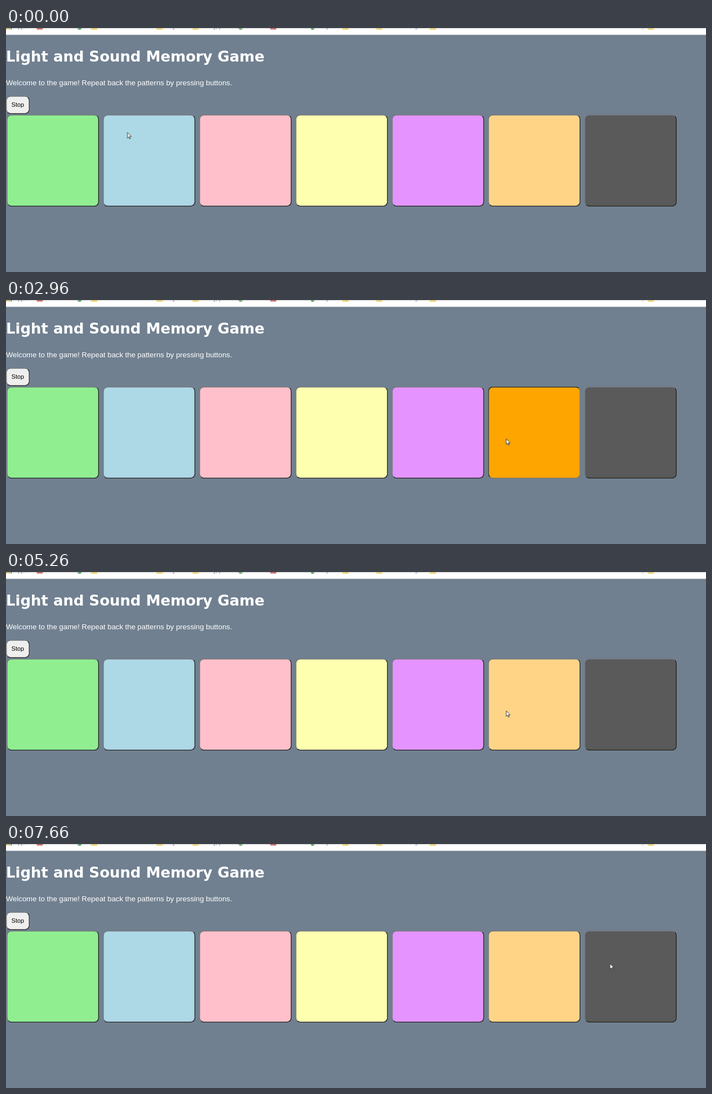
An HTML page for the animation above (8 s loop, 1265 px wide and 443 px high).

```html
<!DOCTYPE html>
<html lang="en">
<head>
<meta charset="utf-8">
<title>Light and Sound Memory Game</title>
<style>
  html, body { margin: 0; width: 100%; height: 100%; overflow: hidden; background: #708090; }
  /* The page is laid out at 1.5 times the stage size. */
  #page { position: absolute; left: 0; top: 0; transform: scale(.6666667); transform-origin: 0 0; }
  .button {
    position: absolute; box-sizing: border-box;
    border: 2px solid; border-color: #767676 #212121 #212121 #767676;
    border-radius: 12.5px;
  }
  .tile { top: 236px; width: 250px; height: 250px; }
  .stop { left: 0; top: 185px; width: 64px; height: 49px; background: #efefef; }
  svg { position: absolute; left: 0; top: 0; }
  text { font-family: "Liberation Sans", Arial, sans-serif; font-size: 13.333px; fill: #fff; }
  .title { font: bold 26.42px "DejaVu Sans", Verdana, sans-serif; }
  .label { font-size: 11.11px; fill: #000; }
  .bookmark { font-size: 10px; fill: #555; }
</style>
</head>
<body>
<div id="page"><div class="button stop"></div></div>
<svg width="1265" height="443" viewBox="0 0 1265 443">
  <rect width="1265" height="12.4" fill="#fff"/>
  <g id="bookmarks">
    <path d="M0 0h3v2.5h-3z" fill="#e8a33d"/>
    <path d="M4 0h3v2.5h-3z" fill="#d9a441"/>
    <path d="M8 0h3v2.5h-3z" fill="#4a9a58"/>
    <circle cx="133" cy="-1.5" r="4.7" fill="#3c9a5f"/>
    <circle cx="424" cy="-1.5" r="4.7" fill="#5aa860"/>
    <circle cx="554" cy="0" r="3.2" fill="#2fa84f"/>
    <path d="M1150.5 0V4" stroke="#ccc"/>
  </g>
  <rect width="1265" height=".8" fill="#b4b4b4"/>
  <text class="title" x="0" y="61">Light and Sound Memory Game</text>
  <text x="0" y="103.7">Welcome to the game! Repeat back the patterns by pressing buttons.</text>
  <text class="label" x="9.8" y="143">Stop</text>
  <g id="cursor">
    <path transform="scale(.6667)" d="M.6 1V16.2L4.1 12.9L6.6 18.4L8.7 17.5L6.3 12.1H11.2Z"
          fill="#fff" stroke="#111" stroke-width="1.2"/>
  </g>
</svg>
<script>
const LOOP = 8000;
const page = document.getElementById('page');
const bookmarks = document.getElementById('bookmarks');

function addShape(name, attributes, content = '') {
  const shape = document.createElementNS('http://www.w3.org/2000/svg', name);
  for (const key in attributes) shape.setAttribute(key, attributes[key]);
  shape.textContent = content;
  bookmarks.append(shape);
}

for (const x of [154, 272, 337, 608, 669, 766, 1160])
  addShape('rect', { x, y: 0, width: 11, height: 3.2, rx: .6, fill: '#f5d565' });
for (const x of [55, 477])
  addShape('rect', { x, y: -4, width: 12, height: 6.6, rx: 2, fill: '#c83c3c' });
for (const [x, label] of [[15, 'Apps'], [301, 'y'], [375, 'y, p'], [579, 'p'], [740, 'p']])
  addShape('text', { x, y: .6, class: 'bookmark' }, label);

const colors = ['#90ee90', '#add8e6', '#ffc0cb', '#ffffb0', '#e493ff', '#ffd487', '#5a5a5a'];
const tiles = colors.map((color, i) => {
  const tile = document.createElement('div');
  tile.className = 'button tile';
  tile.style.left = 2 + 261 * i + 'px';
  tile.style.background = color;
  page.append(tile);
  return tile;
});

// Each row of steps starts with its time in ms and holds until the next one.
function play(element, steps, toStyle) {
  const frames = steps.map(([time, ...state]) =>
    ({ offset: time / LOOP, easing: 'step-end', ...toStyle(...state) }));
  frames.push({ ...frames.at(-1), offset: 1 });
  return element.animate(frames, { duration: LOOP, iterations: Infinity });
}

const raised = '#767676 #212121 #212121 #767676';
const sunken = '#212121 #767676 #767676 #212121';
const looks = {
  idle: { backgroundColor: colors[5], borderColor: raised },
  lit: { backgroundColor: '#ffa500', borderColor: raised },
  pressed: { backgroundColor: '#ffa500', borderColor: sunken }
};

const tileMotion = play(tiles[5], [
  [0, 'idle'], [880, 'lit'], [1910, 'idle'], [2960, 'pressed'], [3210, 'idle'],
  [4240, 'lit'], [5260, 'idle'], [5510, 'lit'], [6540, 'idle'],
  [7170, 'pressed'], [7420, 'idle']
], look => looks[look]);

const cursorMotion = play(document.getElementById('cursor'), [
  [0, 219, 189], [120, 745, 276],
  [260, 806, 291], [380, 846, 285], [500, 868, 273], [620, 880, 263], [740, 884, 258],
  [2570, 888, 256], [2710, 903.7, 251.3],
  [7420, 906, 251], [7540, 1012, 232], [7660, 1091, 216.3]
], (x, y) => ({ transform: `translate(${x}px, ${y}px)` }));

tileMotion.startTime = cursorMotion.startTime = document.timeline.currentTime;
</script>
</body>
</html>
```
